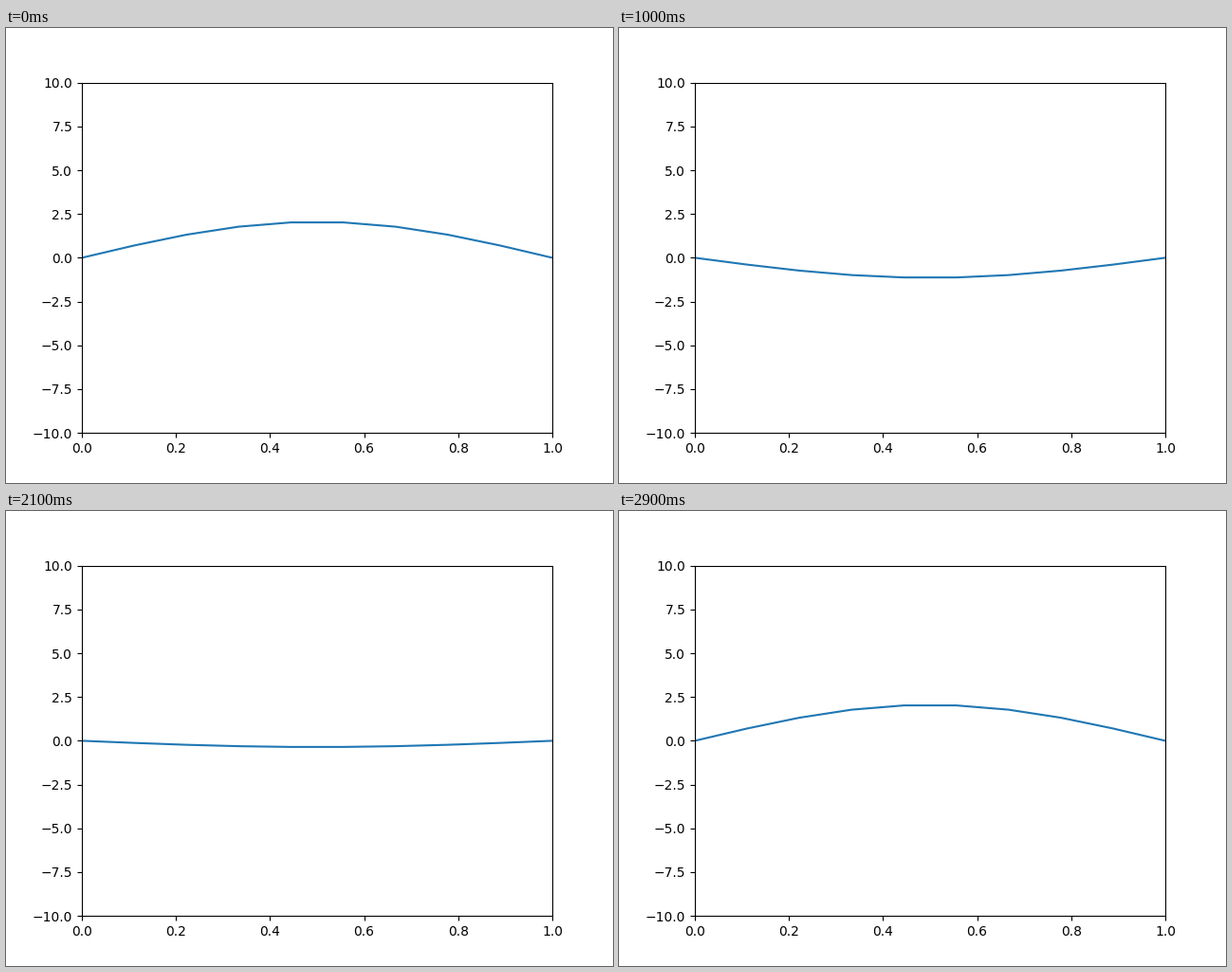
Write a matplotlib script that moves like this. It is 640 by 480 pixels and loops after 3000 ms.

```python
import numpy as np
import matplotlib.pyplot as plt
from matplotlib.animation import FuncAnimation

FRAMES = 30
INTERVAL = 100      # ms per frame
AMPLITUDE = 2.05
PERIOD = 29.08      # frames per oscillation

fig, ax = plt.subplots(figsize=(6.4, 4.8), dpi=100)
ax.set_xlim(0, 1)
ax.set_ylim(-10, 10)

x = np.linspace(0, 1, 10)
shape = AMPLITUDE * np.sin(np.pi * x)
line, = ax.plot(x, shape, color="#1f77b4", lw=1.5)


def update(i):
    """Swing the half-wave as a standing wave."""
    line.set_ydata(shape * np.cos(2 * np.pi * i / PERIOD))
    return line,


anim = FuncAnimation(fig, update, frames=FRAMES, interval=INTERVAL,
                     repeat=True, repeat_delay=0)
plt.show()
```
